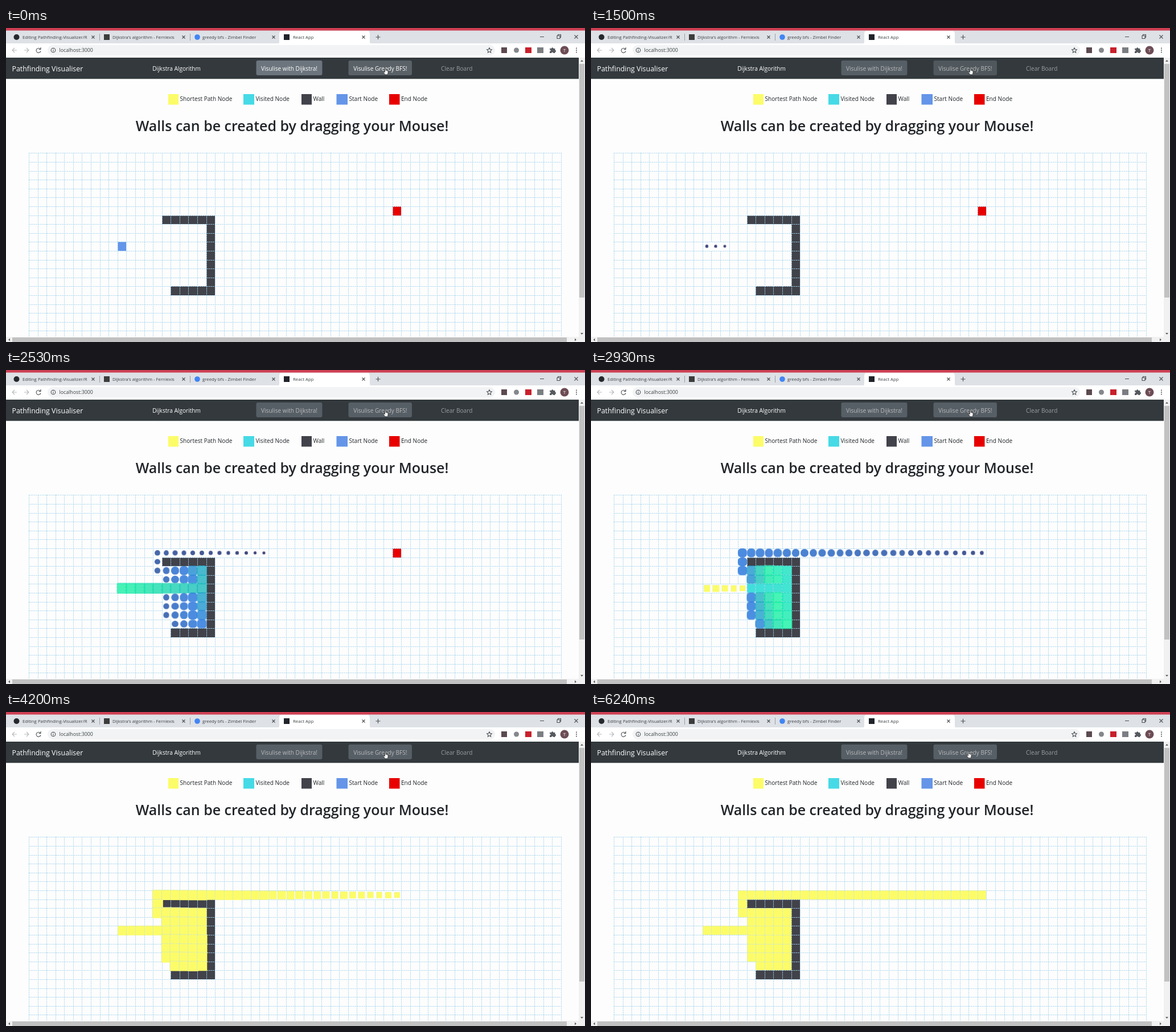
Recreate the animation shown at these times as an HTML page. Size 1017 by 551 pixels, loop 6.28 s.

```html
<!DOCTYPE html>
<html lang="en">
<head>
<meta charset="utf-8">
<title>Pathfinding Visualiser</title>
<style>
html, body { margin: 0; width: 100%; height: 100%; overflow: hidden; background: #fdfdfd; }
#stage { position: absolute; left: 0; top: 0; width: 1017px; height: 551px; overflow: hidden; }
#stage * { animation-play-state: paused !important; }
svg, #board { position: absolute; left: 0; top: 0; }
text { font-family: "Open Sans", "Noto Sans", sans-serif; font-size: 10.1px; fill: #212529; }
.tab { font-size: 7.8px; fill: #3c4043; }
.mid { text-anchor: middle; }
.nav text { fill: #fff; }
.icon { fill: none; stroke: #4b4f54; stroke-width: 1.1; }

.cell, .edge { position: absolute; box-sizing: border-box; opacity: 0; }
.cell {
  border: 0 dashed #a9d6ee;
  border-width: 1px 0 0 1px;
  animation: visited 1.5s ease-out var(--seen) forwards, path 1.5s ease-out var(--path) forwards;
}
.edge { background: #fdfdfd; animation: show 1ms var(--seen) forwards; }
.ends { animation: hide 1ms var(--seen) forwards; }
#buttons { animation: dim 1ms 1.44s forwards; }
#pressed { fill: #5a6268; animation: release .15s ease-in-out 1.44s forwards; }
#cursor { animation: nudge .1s 4.6s forwards; }

@keyframes visited {
  0% { opacity: 1; transform: scale(.3); background-color: rgba(0,0,66,.75); border-radius: 100%; border-color: transparent; }
  50% { background-color: rgba(17,104,217,.75); border-color: transparent; }
  75% { transform: scale(1.2); background-color: rgba(8,242,156,.75); }
  100% { opacity: 1; transform: scale(1); background-color: rgba(0,207,217,.75); border-radius: 0; border-color: #a9d6ee; }
}
@keyframes path {
  0% { transform: scale(.6); background-color: #fcfc69; border-radius: 0; border-color: #d9eca0; }
  50% { transform: scale(1.2); }
  100% { transform: scale(1); background-color: #fcfc69; border-radius: 0; border-color: #d5e8c0; }
}
@keyframes show { to { opacity: 1; } }
@keyframes hide { to { opacity: 0; } }
@keyframes dim { to { opacity: .65; } }
@keyframes release { to { fill: #6c757d; } }
@keyframes nudge { to { transform: translate(-3px, -1px); } }
</style>
</head>
<body>
<div id="stage">
<svg width="1017" height="551" viewBox="0 0 1017 551">
  <!-- browser tabs -->
  <rect width="1017" height="28" fill="#dee1e6"/>
  <rect width="1017" height="4.5" fill="#cf4054"/>
  <path d="M476 28q4 0 4-4V10q0-5 5-5h149q5 0 5 5v14q0 4 4 4z" fill="#fff"/>
  <path d="M164.500 10v12M323.500 10v12" stroke="#9a9da2"/>
  <circle cx="18.500" cy="16" r="5" fill="#24292e"/>
  <rect x="172" y="11" width="10" height="10" fill="#3c3c3c"/>
  <circle cx="336" cy="16" r="4.800" fill="#4285f4"/>
  <rect x="488" y="11" width="10" height="10" fill="#20232a"/>
  <svg x="0" y="0" width="143" height="28"><text class="tab" x="29" y="19">Editing Pathfinding-Visualizer/README</text></svg>
  <text class="tab" x="187" y="19">Dijkstra's algorithm - Fernlexis</text>
  <text class="tab" x="345" y="19">greedy bfs - Zimbel Finder</text>
  <text class="tab" x="504" y="19">React App</text>
  <g id="closers" class="icon"></g>
  <path class="icon" d="M649.500 16h8M653.500 12v8M938 15.500h7M968 13.500h5v5h-5zM969.500 13v-1.500h5v5H973M998.500 12.500l6 6m0-6l-6 6"/>

  <!-- toolbar -->
  <rect y="27" width="1017" height="25" fill="#fff"/>
  <rect x="73" y="30" width="786" height="18" rx="9" fill="#f1f3f4"/>
  <path class="icon" style="stroke:#b5b8bb" d="M19 39h-8m4-4l-4 4 4 4M32 39h8m-4-4l4 4-4 4"/>
  <path class="icon" d="M60.300 37A4 4 0 1 0 61 40.500M61 34v3.500h-3.500"/>
  <circle class="icon" cx="83" cy="39" r="3.800"/>
  <path class="icon" d="M83 38.500v2.700M83 36.500v1"/>
  <text x="93.500" y="42.300" style="font-size:8.800px;fill:#3c4043">localhost:3000</text>
  <path class="icon" d="M849 34.800l1.300 2.800 3 .4-2.200 2.100.5 3-2.600-1.500-2.600 1.500.5-3-2.200-2.100 3-.4z"/>
  <rect x="870" y="34" width="10" height="10" fill="#5c4a50"/>
  <circle cx="896.500" cy="39" r="4.500" fill="#85888b"/>
  <rect x="912" y="34" width="11" height="10" fill="#c8202c"/>
  <rect x="933" y="34" width="11" height="10" fill="#7b7e82"/>
  <path fill="#55595e" d="M955 36h3a1.700 1.700 0 0 1 3.400 0h3v2.800a1.700 1.700 0 0 1 0 3.400V44h-3a1.600 1.600 0 0 0-3.200 0H955v-3a1.600 1.600 0 0 0 0-3.200z"/>
  <circle cx="981" cy="39" r="7.500" fill="#6d4c55"/>
  <text class="mid" x="981" y="42" style="font-size:8px;fill:#fff">T</text>
  <g fill="#4b4f54"><circle cx="1002" cy="35.500" r="1"/><circle cx="1002" cy="39" r="1"/><circle cx="1002" cy="42.500" r="1"/></g>

  <!-- page header -->
  <g class="nav">
    <rect y="52" width="1006" height="37.300" fill="#33393d"/>
    <text x="10.500" y="76.300" style="font-size:12.400px">Pathfinding Visualiser</text>
    <text class="mid" x="299.500" y="74.800">Dijkstra Algorithm</text>
    <g id="buttons">
      <rect x="439.500" y="57" width="116" height="26" rx="3" fill="#6c757d"/>
      <rect id="pressed" x="601.500" y="57" width="111.500" height="26" rx="3"/>
      <text class="mid" x="497.500" y="74.500">Visulise with Dijkstra!</text>
      <text class="mid" x="657.300" y="74.500">Visulise Greedy BFS!</text>
    </g>
    <text class="mid" x="791.700" y="74.800" style="fill:#9a9da0">Clear Board</text>
  </g>
  <g id="legend"></g>
  <text class="mid" x="502.500" y="181.300" style="font-size:25px;font-weight:600">Walls can be created by dragging your Mouse!</text>
  <g id="walls" fill="#41424a"></g>
  <path id="grid" fill="none" stroke="#a9d6ee" stroke-dasharray="2 1.2"/>
</svg>

<div id="board"></div>

<svg width="1017" height="551" viewBox="0 0 1017 551">
  <!-- scrollbars -->
  <path d="M1006 52h11v499H0v-9h1006z" fill="#f1f1f1"/>
  <path d="M1007 63h9v410h-9zM11 543h974v8H11z" fill="#c0c1c0"/>
  <path d="M1009 59l2.500-3 2.500 3zM1009 535l2.500 3 2.500-3zM7 544.500v5l-3-2.500zM999 544.500v5l3-2.500z" fill="#606060"/>
  <path id="cursor" d="M665.500 70.500q1.200-1 1.600.6v3.400l3 .7q1.200.4 1.100 1.600l-.6 3.700-.6 1.300h-4l-3-4q-.2-1.200 1-1l1.500 1z" fill="#fff" stroke="#222" stroke-width=".7"/>
</svg>
</div>

<script>
const LOOP = 6280, START = 1455, STEP = 20;
const COLS = 60, ROWS = 21;
const from = [10, 10], goal = [41, 6];
const $ = id => document.getElementById(id);
const X = c => Math.round(40 + 15.58 * c);
const Y = r => Math.round(219.4 + 15.6 * r);
const key = (c, r) => c + "," + r;
const box = (c, r, attrs = "") =>
  `<rect x="${X(c)}" y="${Y(r)}" width="${X(c + 1) - X(c)}" height="${Y(r + 1) - Y(r)}" ${attrs}/>`;

// Walls: top arm, right side, bottom arm
const walls = new Map();
const wall = (c, r) => walls.set(key(c, r), [c, r]);
for (let c = 15; c <= 20; c++) wall(c, 7);
for (let r = 8; r <= 15; r++) wall(20, r);
for (let c = 16; c < 20; c++) wall(c, 15);

// Greedy best-first search by straight-line distance
function search() {
  const dist = ([c, r]) => (c - goal[0]) ** 2 + (r - goal[1]) ** 2;
  const known = new Set([key(...from)]);
  const open = [from], order = [];
  while (open.length) {
    open.sort((a, b) => dist(a) - dist(b));
    const [c, r] = open.shift();
    order.push([c, r]);
    if (c === goal[0] && r === goal[1]) break;
    for (const [x, y] of [[c, r - 1], [c + 1, r], [c, r + 1], [c - 1, r]]) {
      const k = key(x, y);
      if (x < 0 || y < 0 || x >= COLS || y >= ROWS || known.has(k) || walls.has(k)) continue;
      known.add(k);
      open.push([x, y]);
    }
  }
  return order;
}
const order = search();
const rank = new Map(order.map(([c, r], i) => [key(c, r), i]));
const seenAt = i => START + STEP * i;

function addDiv(name, x, y, w, h, i) {
  const el = document.createElement("div");
  el.className = name;
  el.style.cssText = `left:${x}px;top:${y}px;width:${w}px;height:${h}px;` +
    `--seen:${seenAt(i)}ms;--path:${seenAt(i + order.length)}ms`;
  $("board").append(el);
}

function drawStatic() {
  $("closers").innerHTML = [153, 312, 470, 628]
    .map(x => `<path d="M${x - 2.5} 13.500l5 5m0-5l-5 5"/>`).join("");
  $("legend").innerHTML = [
    [285, 18, "#fcfc69", "Shortest Path Node"],
    [417, 19, "#46dae6", "Visited Node"],
    [519, 18, "#41424a", "Wall"],
    [580.5, 19.5, "#6495e8", "Start Node"],
    [673, 18.5, "#e80000", "End Node"]
  ].map(([x, w, fill, label]) =>
    `<rect x="${x}" y="116" width="${w}" height="18.500" fill="${fill}"/>` +
    `<text x="${x + w + 2.5}" y="128.300">${label}</text>`).join("");

  const mark = (cell, fill) =>
    box(...cell, `class="ends" fill="${fill}" style="--seen:${seenAt(rank.get(key(...cell)))}ms"`);
  $("walls").innerHTML = [...walls.values()].map(([c, r]) => box(c, r)).join("") +
    mark(from, "#6495e8") + mark(goal, "#e80000");

  let d = "";
  for (let c = 0; c <= COLS; c++) d += `M${X(c) + .5} 219V542`;
  for (let r = 0; r < ROWS; r++) d += `M40 ${Y(r) + .5}H975`;
  $("grid").setAttribute("d", d);
}

function drawCells() {
  const cells = [...order].sort((a, b) => a[1] - b[1] || a[0] - b[0]);
  // Lines between two growing cells disappear
  for (const [c, r] of cells) {
    const i = rank.get(key(c, r));
    const right = rank.get(key(c + 1, r)), below = rank.get(key(c, r + 1));
    if (right !== undefined) addDiv("edge", X(c + 1), Y(r) + 1, 1, Y(r + 1) - Y(r) - 1, Math.max(i, right));
    if (below !== undefined) addDiv("edge", X(c) + 1, Y(r + 1), X(c + 1) - X(c) - 1, 1, Math.max(i, below));
  }
  for (const [c, r] of cells)
    addDiv("cell", X(c), Y(r), X(c + 1) - X(c), Y(r + 1) - Y(r), rank.get(key(c, r)));
}

drawStatic();
drawCells();
const animations = document.getAnimations();
function frame() {
  const t = performance.now() % LOOP;
  for (const a of animations) a.currentTime = t;
  requestAnimationFrame(frame);
}
frame();
</script>
</body>
</html>
```
